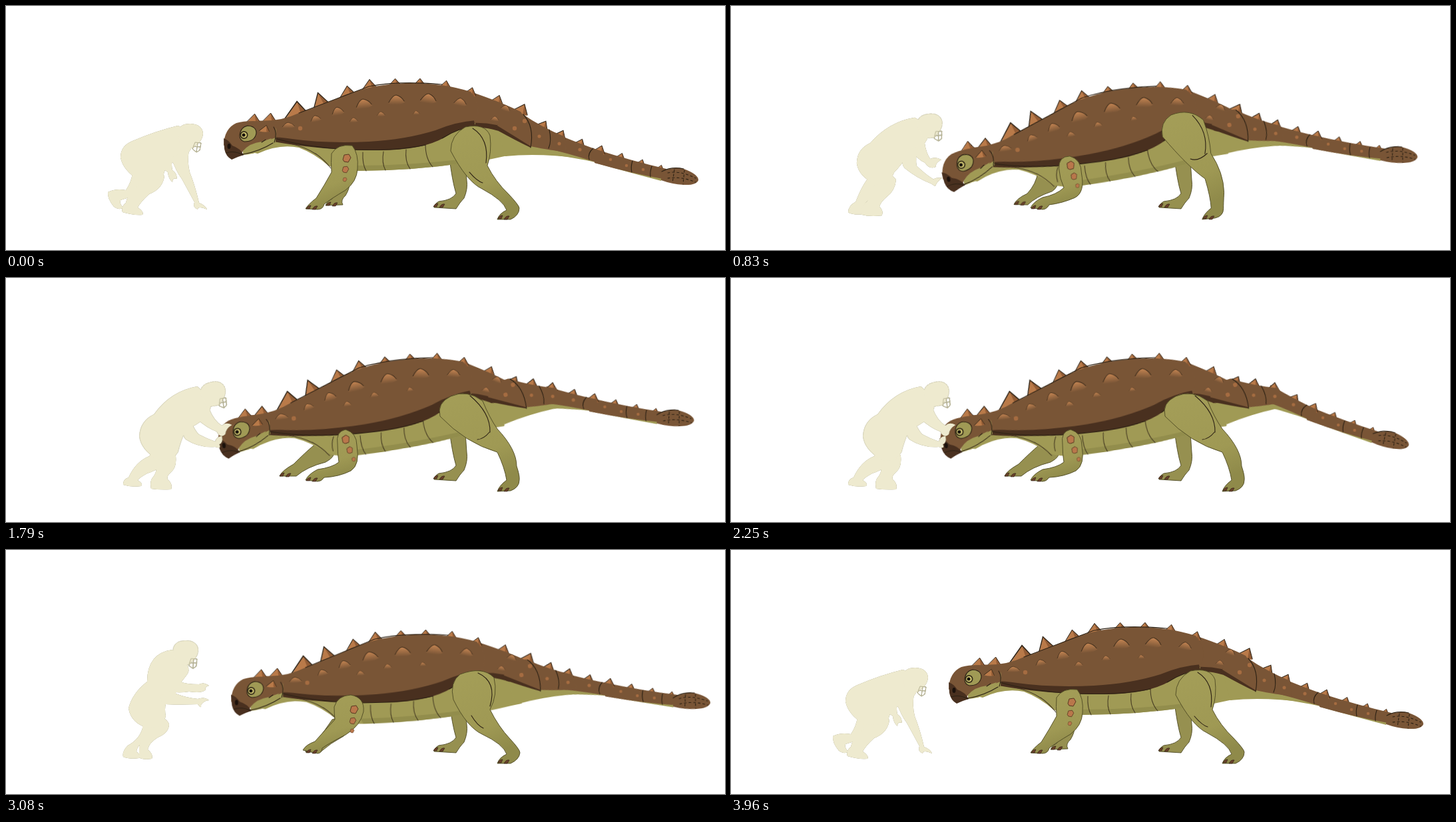
Recreate the animation shown at these times as an HTML page without scripts. Size 1080 by 367 pixels, loop 4000 ms.

```html
<!DOCTYPE html>
<html lang="en">
<head>
<meta charset="utf-8">
<title>Armoured dinosaur and player</title>
<style>
html, body { margin: 0; width: 100%; height: 100%; overflow: hidden; background: #fff; }
svg { display: block; width: 100%; height: 100%; }
.m { animation: 4s infinite cubic-bezier(.4, .12, .6, .88); }
.line { fill: none; stroke: #2c2114; stroke-width: 1.1; stroke-linecap: round; }
.brown { fill: #795536; }
.dark { fill: #49301f; }
.green { fill: #a09a55; }
.leg { fill: url(#skin); stroke: #4d4923; stroke-width: .9; }
.far { fill: #969050; }
#man { fill: #eeeacf; filter: drop-shadow(0 0 .4px #8f8c6c); }

/* dinosaur body */
#place { animation-name: place; }
#front { animation-name: front; transform-origin: 698px 129px; }
#head { animation-name: head; transform-origin: 370px 190px; }
#rump { animation-name: rump; transform-origin: 698px 129px; }
#tail1 { animation-name: tail1; transform-origin: 740px 180px; }
#tail2 { animation-name: tail2; transform-origin: 832px 203px; }
#tail3 { animation-name: tail3; transform-origin: 890px 225px; }
@keyframes place {
  0%, 98.5%, 100% { transform: none; }
  12.5% { transform: translate(-12px, -3px); }
  30%, 55% { transform: translate(-16px, -3px); }
  40%, 67.75% { transform: translate(-10px, -3px); }
  77% { transform: translate(9px, 9px); }
  82% { transform: translate(13px, 8px); }
}
@keyframes front {
  0%, 98.5%, 100% { transform: rotate(0deg) scale(1); }
  12.5% { transform: rotate(-8.4deg) scale(1.033); }
  30%, 67.75% { transform: rotate(-6.4deg) scale(1.024); }
  77% { transform: rotate(-1.5deg) scale(1); }
}
@keyframes head {
  0%, 77%, 100% { transform: rotate(0deg); }
  12.5% { transform: rotate(-6deg); }
  30%, 67.75% { transform: rotate(-2deg); }
}
@keyframes rump {
  0%, 98.5%, 100% { transform: rotate(0deg); }
  12.5% { transform: rotate(1.8deg); }
  30%, 67.75% { transform: rotate(2.5deg); }
  77% { transform: rotate(-1deg); }
}
@keyframes tail1 {
  0%, 98.5%, 100% { transform: rotate(0deg); }
  12.5% { transform: rotate(-3.2deg); }
  30%, 67.75% { transform: rotate(-19.5deg); }
  77% { transform: rotate(-9deg); }
}
@keyframes tail2 {
  0%, 98.5%, 100% { transform: rotate(0deg); }
  12.5% { transform: rotate(-16.4deg); }
  30%, 55% { transform: rotate(24.8deg); }
  42%, 67.75% { transform: rotate(8.4deg); }
  77% { transform: rotate(2deg); }
}
@keyframes tail3 {
  0%, 98.5%, 100% { transform: rotate(0deg); }
  12.5% { transform: rotate(4.3deg); }
  30%, 55% { transform: rotate(-2.8deg); }
  42%, 67.75% { transform: rotate(2.6deg); }
  77% { transform: rotate(2deg); }
}

/* dinosaur legs */
#hind { animation-name: hind; }
#fore { animation-name: fore; }
#foreFar { animation-name: foreFar; }
#hindToes { animation-name: hindToes; }
#farToes { animation-name: farToes; }
#scutes { animation-name: scutes; transform-origin: 510px 245px; }
#thigh { animation-name: thigh; }
@keyframes hind {
  0%, 98.5%, 100% { d: path("M668 218Q668 194 690 182Q720 176 727 195Q730 220 723 240Q735 264 755 283Q771 300 771 304Q771 315 758 321L738 321Q741 312 752 307Q747 292 715 275Q692 264 668 218Z"); }
  12.5% { d: path("M645 187Q641 164 655 152Q686 141 704 160Q713 185 706 217Q717 245 718 278Q712 298 713 305Q713 317 701 318L682 321Q685 312 695 304Q696 290 690 258Q682 235 645 187Z"); }
  30%, 67.75% { d: path("M652 208Q647 188 668 178Q692 167 716 185Q726 210 738 227Q767 258 767 283Q772 298 771 304Q771 315 758 320L738 321Q741 312 752 304Q749 285 738 262Q690 248 652 208Z"); }
  77% { d: path("M672 225Q666 199 682 187Q716 174 733 192Q739 218 727 240Q740 266 757 284Q772 300 772 305Q771 315 758 321L738 321Q741 312 752 307Q747 292 715 277Q692 266 672 225Z"); }
}
@keyframes thigh {
  0%, 98.5%, 100% { d: path("M701 184Q726 200 721 236M696 250Q708 264 716 266"); }
  12.5% { d: path("M690 154Q709 178 699 214M675 219Q688 228 706 213"); }
  30%, 67.75% { d: path("M697 177Q728 203 727 232M708 243Q718 242 726 232"); }
  77% { d: path("M709 185Q738 198 727 235M699 249Q708 264 717 268"); }
}
@keyframes fore {
  0%, 98.5%, 100% { d: path("M489 222Q498 207 520 210Q530 222 528 245Q527 264 510 277Q488 290 478 298Q476 306 468 306L450 305Q454 298 466 289Q478 270 489 250Q488 235 489 222Z"); }
  12.5% { d: path("M488 240Q489 222 508 224Q526 229 526 252Q532 280 515 287Q494 295 478 298Q474 306 468 306L450 303Q454 294 468 288Q488 283 500 270Q490 255 488 240Z"); }
  30%, 67.75% { d: path("M498 250Q495 231 510 228Q527 233 527 252Q532 281 518 290Q500 299 478 300Q474 306 468 306L450 304Q454 295 468 288Q490 285 500 277Q498 265 498 250Z"); }
  77% { d: path("M493 236Q498 219 518 218Q539 222 537 243Q533 264 510 278Q488 289 475 298Q474 306 468 306L446 301Q450 293 464 288Q480 270 494 255Q493 245 493 236Z"); }
}
@keyframes foreFar {
  0%, 98.5%, 100% { d: path("M505 250Q524 262 510 285Q502 292 506 299L480 300Q482 294 490 290Q488 272 495 255Z"); }
  12.5% { d: path("M468 248Q498 265 485 280Q462 290 454 300L437 299Q440 290 456 284Q466 272 460 248Z"); }
  30%, 67.75% { d: path("M475 245Q508 262 480 277Q452 284 436 298L411 298Q414 290 432 280Q450 262 462 252Z"); }
  77% { d: path("M505 250Q526 262 507 280Q488 290 472 304L450 304Q452 294 466 288Q480 270 490 255Z"); }
}
@keyframes hindToes {
  0%, 30%, 100% { transform: none; }
  12.5% { transform: translate(-56px, 0); }
}
@keyframes farToes {
  0%, 98.5%, 100% { transform: translate(70px, 2px); }
  12.5% { transform: translate(27px, 1px); }
  30%, 67.75% { transform: none; }
  77% { transform: translate(38px, 4px); }
}
@keyframes scutes {
  0%, 98.5%, 100% { transform: translate(0, 0) rotate(0deg); }
  12.5% { transform: translate(4px, 8px) rotate(-21deg); }
  30%, 67.75% { transform: translate(6px, 13px) rotate(-27deg); }
  77% { transform: translate(11px, 11px) rotate(0deg); }
}

/* player */
#push { animation-name: push; }
#helmet { animation-name: helmet; transform-origin: 277px 193px; }
#torso { animation-name: torso; }
#armNear { animation-name: armNear; }
#armFar { animation-name: armFar; }
#legNear { animation-name: legNear; }
#legFar { animation-name: legFar; }
@keyframes push {
  0%, 30%, 55%, 77%, 100% { transform: none; }
  40%, 67.75% { transform: translate(3px, 0); }
}
@keyframes helmet {
  0%, 98.5%, 100% { transform: translate(0, 0) rotate(0deg); }
  12.5% { transform: translate(13px, -10px) rotate(-3deg); }
  30%, 67.75% { transform: translate(32px, -21px) rotate(-16deg); }
  77% { transform: translate(-7px, -41px) rotate(-4deg); }
}
@keyframes torso {
  0%, 98.5%, 100% { d: path("M172 228Q172 210 190 203Q225 188 258 180Q280 185 278 215Q265 235 248 236Q238 242 236 258Q220 265 200 262Q176 248 172 228Z"); }
  12.5% { d: path("M181 235Q181 215 200 207Q230 178 268 172Q300 182 288 200Q280 214 262 222Q250 238 236 240Q230 262 215 265Q185 258 181 235Z"); }
  30%, 67.75% { d: path("M198 238Q199 215 220 205Q245 170 285 163Q305 180 305 195Q300 215 268 228Q260 245 256 262Q245 280 225 273Q200 258 198 238Z"); }
  77% { d: path("M184 238Q190 215 212 198Q212 155 250 150Q285 175 270 190Q262 200 248 220Q236 228 240 250Q235 268 215 268Q188 262 184 238Z"); }
}
@keyframes armNear {
  0%, 98.5%, 100% { d: path("M248 228Q256 250 264 260Q276 282 283 295Q280 303 288 306Q288 300 302 306Q300 300 290 296Q284 270 276 250Q272 235 275 215Z"); }
  12.5% { d: path("M256 215Q248 238 255 245Q272 262 290 278Q295 284 298 287Q296 280 313 276Q305 274 297 273Q285 262 272 245Q272 230 285 205Z"); }
  30%, 67.75% { d: path("M264 225Q262 238 268 243Q288 256 312 254Q322 258 318 250Q324 248 322 238Q314 238 312 246Q300 242 287 235Q282 230 276 217Z"); }
  77% { d: path("M232 218Q232 232 240 232Q265 233 288 232Q294 240 293 233Q298 226 305 226Q298 220 288 224Q270 222 255 216Q255 210 262 205Z"); }
}
@keyframes armFar {
  0%, 98.5%, 100% { d: path("M228 238Q236 245 243 250Q244 260 250 265Q250 258 257 260Q256 250 250 247Q248 238 250 232Z"); }
  12.5% { d: path("M258 220Q262 235 272 240Q278 250 291 248Q290 243 298 240Q288 234 280 237Q278 225 280 210Z"); }
  30%, 67.75% { d: path("M283 211Q300 226 314 231Q320 242 327 235Q328 226 337 221Q328 216 322 222Q310 215 303 197Z"); }
  77% { d: path("M240 212Q258 216 275 213Q295 216 300 210Q298 206 305 204Q297 198 290 202Q270 202 262 198Z"); }
}
@keyframes legNear {
  0%, 98.5%, 100% { d: path("M195 250Q215 245 238 255Q236 275 215 283Q202 295 198 303Q208 310 205 314Q190 315 175 310Q172 303 180 296Q185 275 200 270Z"); }
  12.5% { d: path("M200 250Q225 240 242 255Q238 272 222 283Q212 292 206 300Q212 308 208 313Q190 316 176 311Q176 298 190 290Q195 275 210 268Z"); }
  30%, 67.75% { d: path("M225 260Q250 250 255 268Q257 285 247 293Q241 298 243 303Q251 310 248 318Q230 319 218 317Q215 305 222 298Q230 285 222 272Z"); }
  77% { d: path("M205 250Q238 245 245 262Q245 275 228 282Q215 290 213 300Q222 308 219 314Q205 316 200 312Q200 300 200 295Q205 280 210 265Z"); }
}
@keyframes legFar {
  0%, 98.5%, 100% { d: path("M205 250Q215 260 205 272Q190 288 172 292Q170 297 176 303Q170 308 162 302Q152 290 153 280Q165 274 180 277Q188 265 190 252Z"); }
  12.5% { d: path("M205 250Q230 250 235 262Q225 275 212 282Q200 292 198 302Q200 311 195 313Q182 315 176 310Q177 298 190 290Q195 272 195 255Z"); }
  30%, 67.75% { d: path("M225 255Q245 262 238 280Q225 290 212 294Q201 300 198 304Q207 310 203 313Q188 315 176 311Q175 303 184 300Q195 276 215 268Z"); }
  77% { d: path("M205 250Q235 250 235 268Q220 280 207 287Q197 295 196 303Q203 309 200 313Q185 315 176 311Q174 303 183 294Q200 285 205 268Z"); }
}
</style>
</head>
<body>
<svg viewBox="0 0 1080 367" preserveAspectRatio="none">
  <defs>
    <linearGradient id="skin" x1="0" y1="0" x2=".3" y2="1">
      <stop offset="0" stop-color="#a49e58"/><stop offset=".7" stop-color="#9f9954"/><stop offset="1" stop-color="#8f8a4a"/>
    </linearGradient>
    <linearGradient id="glow" x1="0" y1="0" x2="0" y2="1">
      <stop offset="0" stop-color="#c58552"/><stop offset=".95" stop-color="#795536"/>
    </linearGradient>
    <g id="spike">
      <path d="M-12 7L4-10 13 5Q0 9-12 7Z" fill="#b97a49"/>
      <path d="M4-10L13 5Q9 6 6 5Z" fill="#925c35"/>
      <path class="line" d="M-12 6L4-10 13 4"/>
    </g>
    <g id="bump">
      <path d="M-12 5Q-5-8 0-8Q9-5 13 3Q0 10-12 5Z" fill="url(#glow)"/>
      <path class="line" stroke-width=".8" d="M-11 3Q-5-8 0-8Q8-6 12 1" opacity=".7"/>
    </g>
    <circle id="dot" r="3.2" fill="#a56c41"/>
    <path id="scute" d="M-6 2L-4-5 3-6 6-1 2 6-4 5Z" fill="#b9774b" stroke="#583821"/>
    <path id="toes" d="M0 0Q2-5 7-5L5 0ZM9 1Q12-5 17-4L14 1Z" fill="#69402b" stroke="#2c2114" stroke-width=".6"/>
  </defs>

  <path class="leg far" d="M666 228Q670 262 676 282Q670 292 650 294Q643 298 643 303L676 305Q682 295 688 289Q694 275 692 262L690 232Z"/>
  <use href="#toes" x="642" y="302"/>
  <path id="foreFar" class="m leg far"/>
  <g id="farToes" class="m"><use href="#toes" x="411" y="298"/></g>

  <g id="place" class="m">
    <g id="rump" class="m">
      <path class="green" d="M672 180L740 172 768 200 764 223Q748 226 730 230L680 240Z"/>
      <use href="#spike" transform="translate(736 142) rotate(12) scale(.85)"/>
      <use href="#spike" transform="translate(772 156) rotate(18)"/>
      <path class="dark" d="M675 150L735 160 765 180 762 197Q750 192 740 188Q715 180 690 184Z"/>
      <path class="brown" d="M698 129Q745 145 773 159Q782 168 764 189Q750 183 737 179Q710 173 680 178L672 145Z"/>
      <g id="tail1" class="m">
        <path class="green" d="M740 190L840 206 862 229Q800 221 750 226Z"/>
        <g id="tail2" class="m">
          <path class="green" d="M822 206L895 230 918 243Q870 230 822 224Z"/>
          <g id="tail3" class="m">
            <path class="green" d="M885 228L985 256 984 263Q935 250 885 236Z"/>
            <use href="#spike" transform="translate(921 228) rotate(13) scale(.74)"/>
            <use href="#spike" transform="translate(952 237) rotate(13) scale(.68)"/>
            <use href="#spike" transform="translate(981 245) rotate(10) scale(.62)"/>
            <path class="brown" d="M884 215Q940 233 992 245L992 261Q940 252 884 236Z"/>
            <path class="brown" d="M984 250Q1000 241 1018 245Q1040 253 1040 262Q1037 270 1018 269Q1000 268 984 262Z"/>
            <path class="line" d="M941 233Q938 243 940 250M970 241Q967 250 968 257M985 249Q1000 241 1018 245"/>
            <path class="line" stroke-dasharray="3 4" d="M994 251Q1012 247 1036 259M994 259Q1014 256 1036 265M1004 246L1001 266M1019 247L1017 268"/>
            <use href="#dot" transform="translate(932 240) scale(.7)"/>
            <use href="#dot" transform="translate(957 246) scale(.7)"/>
            <use href="#dot" transform="translate(908 231) scale(.7)"/>
          </g>
          <use href="#spike" transform="translate(860 207) rotate(18) scale(.82)"/>
          <use href="#spike" transform="translate(890 217) rotate(14) scale(.8)"/>
          <path class="brown" d="M824 191Q860 207 897 219L898 239Q860 226 824 217Z"/>
          <path class="line" d="M882 214Q873 222 876 231"/>
          <use href="#dot" transform="translate(862 216) scale(.8)"/>
        </g>
        <use href="#spike" transform="translate(804 180) rotate(24) scale(.9)"/>
        <use href="#spike" transform="translate(831 194) rotate(20) scale(.84)"/>
        <path class="dark" d="M738 178L790 195 788 213Q765 202 740 188Z"/>
        <path class="brown" d="M742 163L775 162Q804 182 840 197L842 220Q806 215 788 211Q764 196 738 180Z"/>
        <path class="line" d="M777 163Q794 181 788 213M816 186Q820 203 815 214"/>
        <use href="#dot" transform="translate(801 196) scale(.8)"/>
        <use href="#dot" transform="translate(831 207) scale(.8)"/>
        <use href="#dot" x="764" y="184"/>
        <use href="#dot" x="779" y="173"/>
      </g>
      <use href="#bump" transform="translate(750 154) rotate(20) scale(.6)"/>
      <use href="#bump" transform="translate(734 170) rotate(10) scale(.5)"/>
    </g>

    <g id="front" class="m">
      <path class="green" d="M350 215L400 190 560 200 705 176 690 236Q610 248 525 248Q500 248 484 240Q464 222 440 213Q410 207 378 222Z"/>
      <path d="M525 248Q610 248 690 236L688 230Q610 240 520 240Z" fill="#928d4c"/>
      <path class="line" opacity=".75" d="M536 220Q535 238 541 248M567 219Q564 236 570 247M601 216Q599 234 607 245M630 208Q630 230 641 242M465 222Q478 231 488 244M427 207Q450 212 466 223M497 217Q492 227 494 238"/>
      <use href="#spike" transform="translate(394 170) scale(.9)"/>
      <use href="#spike" transform="translate(434 158) rotate(-10) scale(1.38)"/>
      <use href="#spike" transform="translate(470 146) rotate(-22) scale(1.1 1.5)"/>
      <use href="#spike" transform="translate(511 130) rotate(-14) scale(.92)"/>
      <use href="#spike" transform="translate(544 120) rotate(-10) scale(.9)"/>
      <use href="#spike" transform="translate(582 117) rotate(-6) scale(.85 .75)"/>
      <use href="#spike" transform="translate(619 117) rotate(-4) scale(.85 .78)"/>
      <use href="#spike" transform="translate(658 120) rotate(3) scale(.8)"/>
      <use href="#spike" transform="translate(696 130) rotate(10) scale(.8)"/>
      <path class="dark" d="M380 184L560 175 700 160 705 181Q680 183 658 198Q625 217 560 217Q490 217 435 209Q400 205 380 198Z"/>
      <path class="brown" d="M376 172Q410 175 440 161Q480 147 511 133Q555 117 600 116Q655 115 698 129Q716 150 706 172Q676 174 645 187Q600 201 545 204Q480 207 430 200Q400 195 376 198Z"/>
      <path class="line" d="M404 199Q440 210 500 215Q580 220 630 209M655 199Q680 183 705 181M440 161Q500 138 545 121Q590 112 655 118"/>
      <use href="#bump" transform="translate(586 142)"/>
      <use href="#bump" transform="translate(537 148) rotate(-6)"/>
      <use href="#bump" transform="translate(634 140) rotate(8)"/>
      <use href="#bump" transform="translate(498 159) rotate(-8) scale(.75 .85)"/>
      <use href="#bump" transform="translate(682 145) rotate(12) scale(.8)"/>
      <use href="#bump" transform="translate(465 170) rotate(-10) scale(.65)"/>
      <use href="#bump" transform="translate(522 172) scale(.5)"/>
      <use href="#bump" transform="translate(563 163) scale(.5)"/>
      <use href="#bump" transform="translate(616 161) scale(.4)"/>
      <use href="#bump" transform="translate(424 180) scale(.8 .6)"/>
      <use href="#dot" x="442" y="184"/>

      <g id="head" class="m">
        <use href="#spike" transform="translate(370 171) scale(.88)"/>
        <path class="green" d="M356 222L372 192 406 184 405 204Q390 218 370 222Z"/>
        <path class="brown" d="M327 209Q328 184 346 176Q366 170 406 176L405 198Q385 205 366 212Q355 216 352 225Q335 222 327 209Z"/>
        <path class="green" d="M351 195Q352 182 363 180Q376 181 376 191Q374 204 358 204Q351 202 351 195Z"/>
        <path class="green" d="M356 218Q366 206 384 204L399 199 386 216Q371 223 356 224Z"/>
        <path class="dark" d="M327 199Q334 201 340 210Q352 214 357 224Q347 227 339 231Q330 226 328 215Z"/>
        <path class="line" d="M331 221Q343 217 356 224M402 182Q408 191 403 205M356 223Q380 219 401 206M351 195Q352 182 363 180Q376 181 376 191Q374 204 358 204Q351 202 351 195M384 205L390 201"/>
        <ellipse cx="335" cy="211" rx="2.5" ry="4" fill="#1b110b"/>
        <circle cx="357.500" cy="194" r="6" fill="#332a18"/>
        <circle cx="357.500" cy="194" r="4.300" fill="#d2c873"/>
        <circle cx="357" cy="194" r="2.500" fill="#16110b"/>
        <use href="#spike" transform="translate(388 185) rotate(8) scale(.6)"/>
      </g>
    </g>
  </g>

  <path id="hind" class="m leg"/>
  <path id="thigh" class="m line"/>
  <g id="hindToes" class="m"><use href="#toes" x="739" y="320"/></g>
  <path id="fore" class="m leg"/>
  <use href="#toes" x="451" y="305"/>
  <g id="scutes" class="m">
    <use href="#scute" x="512" y="229"/>
    <use href="#scute" transform="translate(510 246) scale(.8)"/>
    <use href="#scute" transform="translate(509 261) scale(.5)"/>
  </g>

  <g id="man">
    <path id="legFar" class="m"/>
    <path id="legNear" class="m"/>
    <g id="push" class="m">
      <path id="armFar" class="m"/>
      <path id="torso" class="m"/>
      <path id="armNear" class="m"/>
      <g id="helmet" class="m">
        <path d="M258 190Q260 177 277 177Q295 178 296 192Q295 201 290 205L281 214 262 212Z"/>
        <path d="M284 205L293 206 291 217 286 220 280 215ZM281 211L292 212M288 206L286 219" fill="none" stroke="#b9b595" stroke-width="1"/>
      </g>
    </g>
  </g>
</svg>
</body>
</html>
```
